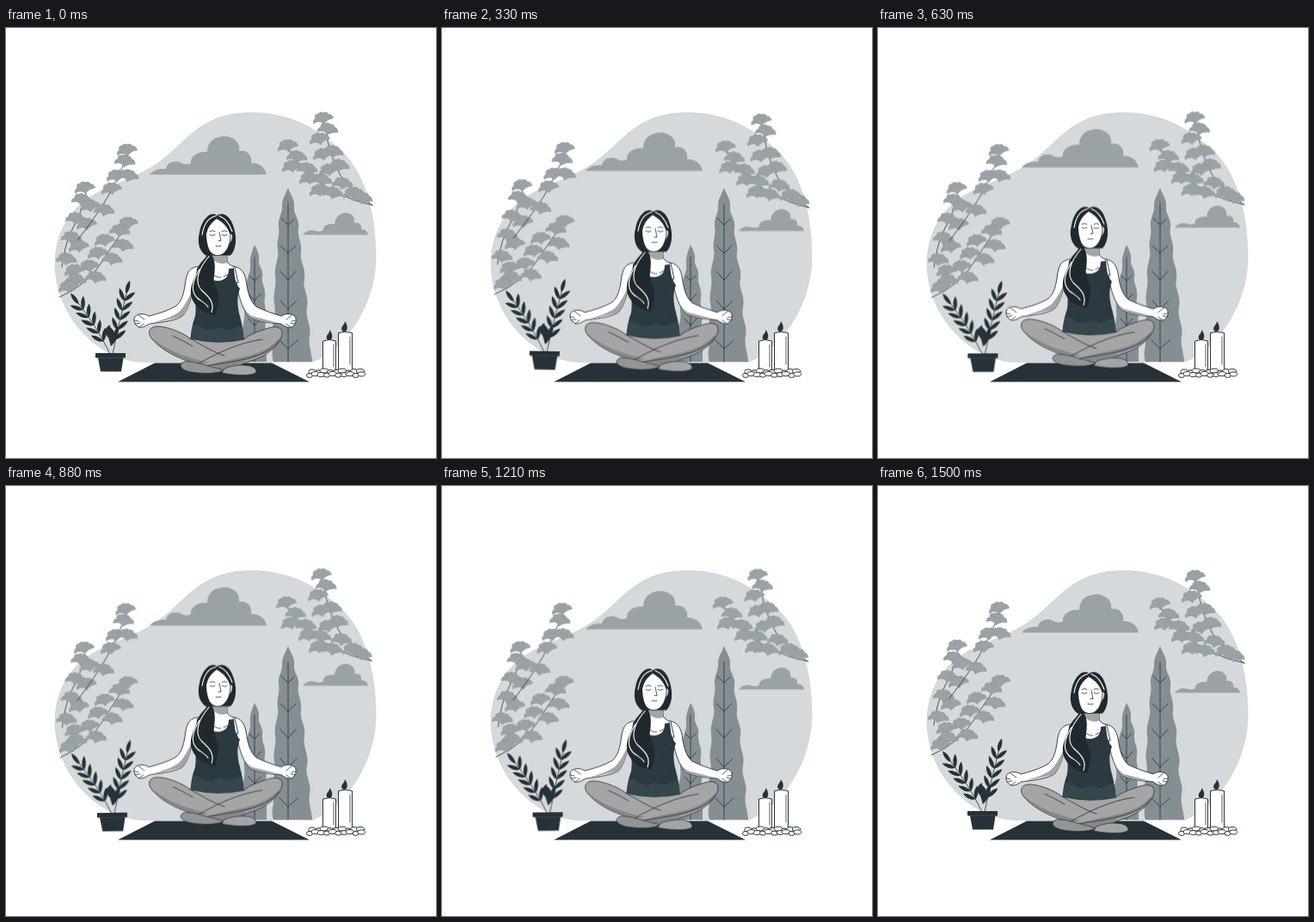
An HTML page that plays this animation: 500x500 px, repeating every 1540 ms.

```html
<!DOCTYPE html>
<html lang="en">
<head>
<meta charset="utf-8">
<title>Meditation</title>
<style>
  html, body { margin: 0; width: 100%; height: 100%; overflow: hidden; background: #fff; }
  svg { display: block; width: 100vw; height: 100vh; }
  .float { animation: float 1540ms linear infinite; }
  .sway { animation: sway 1540ms ease infinite; transform-origin: 250px 250px; }
  /* 1.5 s cycles followed by a 40 ms rest */
  @keyframes float { 0%, 97.4%, 100% { transform: translateY(0); } 48.7% { transform: translateY(-10px); } }
  @keyframes sway {
    0%, 97.4%, 100% { transform: rotate(0); }
    24.35% { transform: rotate(1deg); }
    73.05% { transform: rotate(-1deg); }
  }
  .ink { fill: #263238; }
  .line { fill: none; stroke: #263238; stroke-width: .8; stroke-linecap: round; stroke-linejoin: round; }
  .cloud { fill: #9ba2a5; }
  .tree { fill: #858f93; }
  .skin { fill: #fff; stroke: #263238; stroke-width: .9; stroke-linejoin: round; }
  .shade { fill: #a3a5a6; }
  .cloth { fill: #a5a5a5; stroke: #263238; stroke-width: .8; stroke-linejoin: round; }
  .fold { fill: #878787; }
  .hair { fill: #20292e; }
  .shine { fill: none; stroke: #fff; stroke-width: 1.1; stroke-linecap: round; }
  .leaf { fill: #9ba2a5; stroke: #899195; stroke-width: .4; }
  .wax { fill: #fff; stroke: #263238; stroke-width: 1; }
</style>
</head>
<body>
<svg viewBox="0 0 500 500">
  <defs>
    <path id="fan" class="leaf" d="M0 4C-2 0-7-1-11.500 2Q-13-2-9-4Q-10-9-5-9Q-2-12 1-9.500Q5-11 7-7Q11-7 12-1.500C8-1.500 3 0 0 4Z"/>
    <path id="blade" class="ink" d="M0 0C3-3 10-4 16 0C10 3 4 2 0 0Z"/>
    <path id="flame" class="ink" d="M.5-12C4.500-7 4 0 0 0C-4.500-.5-4-5-1-8Q.5-10 .5-12Z"/>
  </defs>

  <path fill="#d5d9db" stroke="#bfc4c7" stroke-width=".5" d="M283 98.500C330 98 363 117 393 146C420 174 430 222 430 267C430 315 400 371 356 388.500H158C105 385 57 334 57 273C58 231 80 204 111 189C139 176 162 170 187 149C214 126 232 99 283 98.500Z"/>

  <g class="float cloud">
    <path d="M167 170.500C171 166 177 163 186 164C187 156 197 153 204 157C208 159 212 159 215 157C214 149 223 143 234 144C234 132 243 126 254 126C265 126 273 134 271 143C280 141 287 148 285 157C293 156 302 162 303 170.500Z"/>
    <path d="M345 240.500C348 236 355 234 360 236Q366 238 369 235C368 230 375 227 382 228C383 220 388 215 395 215C402 215 407 221 405 227C411 225 414 230 413 234Q420 234 421 240.500Z"/>
  </g>

  <g class="sway" id="branches"></g>

  <g>
    <path class="tree" d="M289 252C292 258 295 263 294 270C293 276 300 281 298 290C297 298 303 304 301 314C299 323 305 330 302 342C300 352 305 362 303 372L303 388H275C273 378 278 370 276 359C273 348 279 340 277 328C276 317 282 310 280 300C279 291 285 284 284 276C283 267 286 260 289 252Z"/>
    <path class="tree" d="M328 186C331 194 336 200 335 208C334 217 342 222 340 233C338 242 345 250 343 261C341 271 349 278 347 291C344 302 353 312 350 325C347 337 356 346 353 358C351 369 356 378 356 388H311C307 377 313 368 311 356C308 343 315 334 312 320C310 308 315 300 313 289C311 277 318 269 316 258C314 248 319 241 317 230C316 221 322 215 321 206C321 199 325 194 328 186Z"/>
    <path class="line" d="M289 266V388M328 205V388M283 288L289 294L295 288M282 309L289 317L296 309M282 338L289 346L296 338M320 221L328 229L335 222M319 253L328 262L337 253M319 283L328 293L337 283M319 317L328 327L338 317M318 363L328 373L339 363"/>
  </g>

  <path class="ink" d="M173 389.500H309L353 411.500H130Z"/>

  <g class="float">
    <!-- arms -->
    <path class="skin" d="M225 277C214 278 211 283 209 293C207 308 205 317 198 323C188 329 177 332 166 335C160 331 153 332 149.500 336C148 341 150 346 155 348C159 349 163 346 167 344C182 342 200 340 206 334C213 326 216 310 219 296Z"/>
    <path class="shade" d="M217 304C214 321 210 332 203 336L168 344C186 338 199 334 204 327Q211 318 217 304Z"/>
    <path class="line" d="M149 340L154 341M150 344L156 343M154 334L161 339M155 348L160 344"/>
    <path class="skin" d="M262 277C272 277 277 283 279 293C281 308 284 318 291 324C301 329 311 332 320 335C326 331 333 332 336.500 336C338.500 341 336 346 332 348C328 349 324 347 320 344C306 343 288 341 282 335C274 326 270 309 268 296Z"/>
    <path class="shade" d="M269 302C273 319 277 330 286 335L317 343C302 343 288 340 282 334C275 326 271 313 269 302Z"/>
    <path class="line" d="M337 340L332 341M336 344L331 343M332 334L326 339M331 348L326 344"/>

    <!-- neck and chest -->
    <path class="skin" d="M239 256V271Q237 276 224 278L219 296H270L266 278Q258 275 257 271V256Z"/>
    <path class="shade" d="M239 259L257 257V273C249 276 241 272 239 265Z"/>
    <path class="line" d="M241 287Q247 291 250 290M264 284L253 289"/>

    <!-- top -->
    <path fill="#2b3940" d="M222 279L230 278C231 289 238 294 247 294C256 293 259 288 259 280L265 279C266 291 267 298 272 303C268 313 269 324 272 335Q276 350 277 367H214Q215 348 220 335C222 322 219 312 217 306C220 298 222 288 222 279Z"/>
    <path fill="#36464d" d="M217 346C224 342 228 351 235 351C243 352 247 345 254 350C263 354 266 344 275 347L277 367H214Z"/>
    <path class="line" d="M268 309Q262 314 257 314M270 334L263 337"/>

    <!-- legs -->
    <path class="cloth" d="M214 361C204 353 184 346 174 347C166 348 164 355 170 362C185 379 207 386 223 391L255 400L282 388C304 382 319 368 321 356C322 348 314 346 305 349C292 353 282 357 277 362Q247 369 214 361Z"/>
    <path class="fold" d="M169 360C183 377 207 385 225 391L236 389C213 384 188 376 169 360Z"/>
    <path class="fold" d="M236 392L254 399L281 388L262 386Z"/>
    <path class="fold" d="M320 358C311 371 294 379 274 383C258 386 245 389 232 393C262 391 310 386 320 358Z"/>
    <path class="line" d="M214 361C230 370 243 378 254 381M298 362C270 366 246 378 224 390M232 393C260 388 303 385 317 364M194 358Q207 364 217 370"/>
    <path fill="#929596" stroke="#263238" stroke-width=".7" d="M207 388C215 387 224 390 232 392L254 398Q242 403 223 401C211 400 203 397 203 392Q204 389 207 388Z"/>
    <path fill="#a2a5a6" stroke="#263238" stroke-width=".7" d="M254 396C264 392 275 391 284 393Q291 395 291 400C288 404 275 404 264 403Q255 402 251 401Z"/>

    <!-- head -->
    <g transform="translate(0 1.500)">
      <path class="hair" d="M245 217C236 211 227 223 225 236C222 249 225 257 232 263H261C268 256 269 241 264 228C261 218 252 211 245 217Z"/>
      <path class="skin" d="M233 237C228 234 228 244 232 249M260 238C265 236 264 245 260 249"/>
      <path class="skin" d="M245 220C239 224 234 230 232 239C231 253 238 263 246 263C255 263 261 252 261 239C258 229 252 224 245 220Z"/>
      <path class="line" d="M237 235Q240 233 243 235M251 235Q254 233 257 235M237 239Q240 241 243 239M251 239Q254 241 257 239M248 236L250 246H247M244 252Q247 253 250 252"/>
      <path class="hair" d="M245 216C239 221 235 229 233 238C233 249 236 256 239 262C244 269 243 279 242 287C240 297 248 304 247 315C247 323 243 328 244 332C233 332 222 325 217 315C211 302 219 292 222 281C224 271 233 267 234 261C226 257 224 247 226 236C230 221 236 211 245 216Z"/>
      <path class="shine" d="M244 217C235 219 230 227 228 239M248 217Q258 221 263 235M236 264C223 279 219 294 227 303C236 311 243 318 239 329M225 279C216 294 215 305 222 312C226 316 232 318 235 323"/>
    </g>
  </g>

  <g class="sway">
    <g id="pot"></g>
    <path class="ink" d="M119 360C112 353 117 347 121 345C120 350 124 353 123 358C127 354 126 349 131 347C132 356 128 365 122 370Z"/>
    <path class="ink" d="M104 378H139V383.500H136.500L134 399.500H110L107 383.500H104Z"/>
    <path fill="none" stroke="#455258" stroke-width=".6" d="M107 383.500H136.500"/>
  </g>

  <g>
    <path class="wax" d="M368.500 364Q376 361 383.500 364V399H368.500ZM386.500 354.500Q394.500 352 402.500 354.500V399H386.500Z"/>
    <path class="line" d="M381 368V394M400 359V391"/>
    <use href="#flame" x="376" y="363"/>
    <use href="#flame" x="393.500" y="353"/>
    <g id="stones"></g>
  </g>
</svg>
<script>
  const put = (id, html) => document.getElementById(id).insertAdjacentHTML('beforeend', html);
  const use = (name, x, y, turn) =>
    `<use href="#${name}" transform="translate(${x} ${y}) rotate(${turn})"/>`;

  // Each branch: its stem, then x, y of the fan leaves.
  const branches = [
    ['M65 278Q68 250 80 228T93 187',
      [92,189, 88,203, 98,210, 81,225, 94,231, 76,247, 85,257, 70,272]],
    ['M83 247Q112 210 125 184T143 141',
      [141,145, 138,158, 129,175, 142,175, 123,190, 114,215]],
    ['M62 313Q95 299 113 270T143 228',
      [142,230, 132,239, 115,250, 136,256, 107,265, 123,272, 97,280, 104,293, 80,285, 81,296, 73,304]],
    ['M426 206Q393 185 383 160T369 104',
      [369,108, 374,121, 365,132, 380,147, 369,150, 387,163, 376,168, 391,184]],
    ['M426 206Q385 197 358 174T327 137',
      [328,140, 338,153, 333,164, 350,167, 353,178, 367,180, 365,192, 380,195, 404,195, 414,201]]
  ];
  for (const [stem, spots] of branches) {
    let html = `<path class="line" d="${stem}"/>`;
    for (let i = 0; i < spots.length; i += 2)
      html += use('fan', spots[i], spots[i + 1], (i % 4 ? 11 : -7));
    put('branches', html);
  }

  // Blades grow in pairs along a quadratic stem.
  function frond(x0, y0, cx, cy, x1, y1) {
    let html = `<path class="line" d="M${x0} ${y0}Q${cx} ${cy} ${x1} ${y1}"/>`;
    for (let i = 0; i < 5; i++) {
      const t = .24 + i * .16, u = 1 - t;
      const x = u * u * x0 + 2 * u * t * cx + t * t * x1;
      const y = u * u * y0 + 2 * u * t * cy + t * t * y1;
      const turn = Math.atan2(u * (cy - y0) + t * (y1 - cy), u * (cx - x0) + t * (x1 - cx)) * 180 / Math.PI;
      html += use('blade', x, y, turn - 36) + use('blade', x, y, turn + 36);
    }
    return html + use('blade', x1, y1, Math.atan2(y1 - cy, x1 - cx) * 180 / Math.PI);
  }
  put('pot', frond(121, 379, 106, 348, 85, 321) + frond(124, 379, 131, 344, 140, 309));

  let pebbles = '';
  for (let i = 0; i < 19; i++) {
    const front = i > 8, k = front ? i - 9 : i;
    pebbles += `<ellipse class="wax" cx="${front ? 353 + k * 6.700 : 356 + k * 7}" cy="${(front ? 403 : 399.500) + Math.sin(i * 2.300)}" rx="${4.200 + Math.sin(i * 4) * .7}" ry="2.500"/>`;
  }
  put('stones', pebbles);
</script>
</body>
</html>
```
